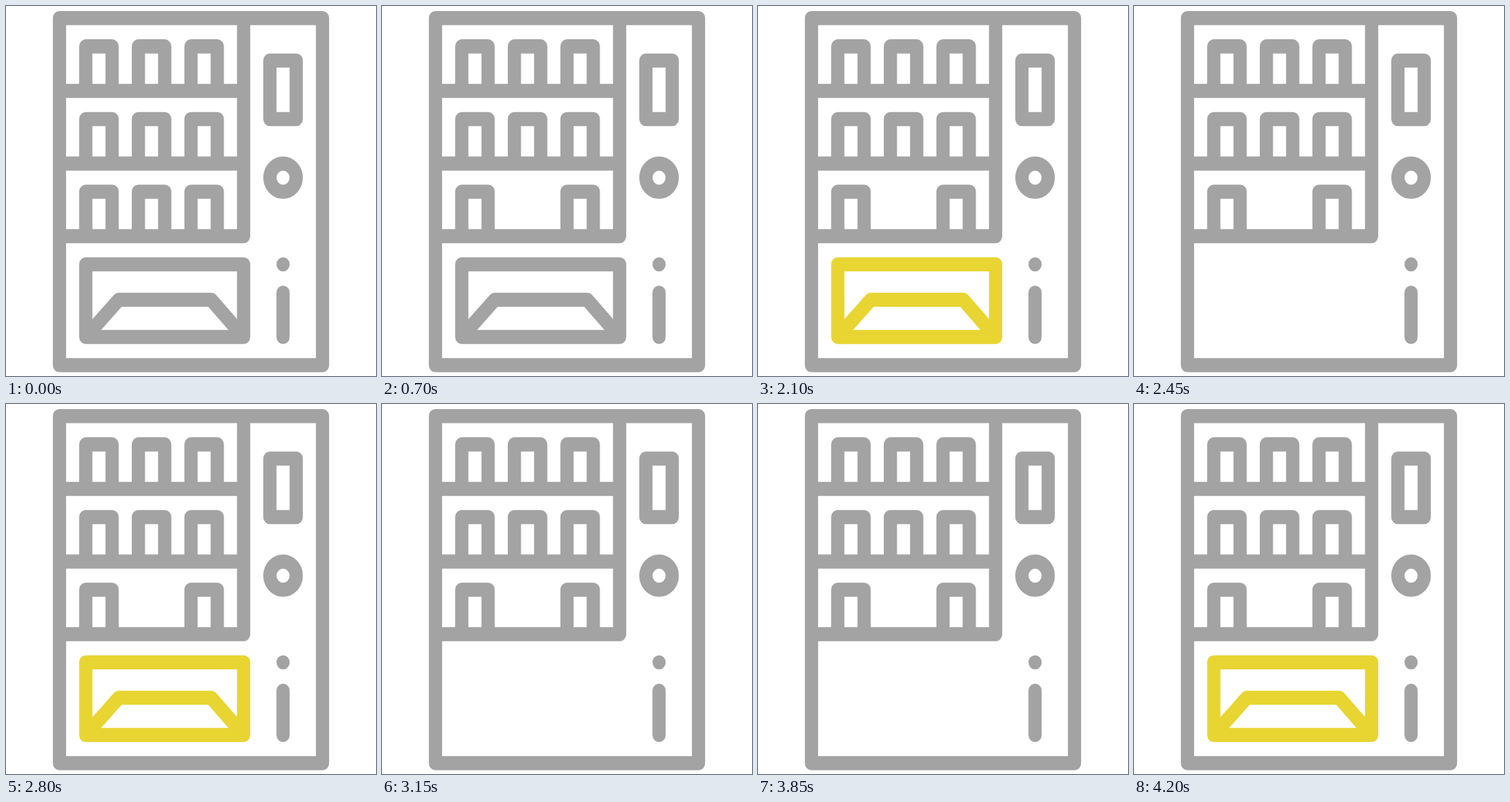
These frames come from a looping animation (512 px wide and 512 px high, 4.55 s). An HTML page:

```html
<!DOCTYPE html>
<html lang="en">
<head>
<meta charset="utf-8">
<title>Vending machine</title>
<style>
  :root { --grey: #a3a3a3; --yellow: #e8d532; }
  html, body { margin: 0; width: 100%; height: 100%; overflow: hidden; background: #fff; }
  svg {
    display: block; width: 100%; height: 100%;
    fill: none; stroke: var(--grey); stroke-width: 18.3; stroke-linejoin: round;
  }
  .sold, .tray, .flap { animation: 4550ms step-end infinite; }
  .sold { animation-name: sell; }
  .tray { animation-name: blink; }
  .flap { animation-name: open; }

  /* The loop has 13 equal beats of 350 ms */
  @keyframes sell {
    0% { stroke: var(--grey); }
    7.69%, 23.07% { stroke: var(--yellow); }
    15.38%, 30.76%, 100% { stroke: transparent; }
  }
  @keyframes open {
    0%, 46.15%, 100% { visibility: visible; }
    38.46% { visibility: hidden; }
  }
  @keyframes blink {
    0%, 100% { stroke: var(--grey); }
    46.15%, 61.53%, 76.92%, 92.3% { stroke: var(--yellow); }
    53.84%, 69.23%, 84.61% { stroke: transparent; }
  }
</style>
</head>
<body>
<!-- The drawing is stretched slightly in height -->
<svg viewBox="0 0 512 478.5" preserveAspectRatio="none">
  <defs>
    <path id="item" d="M110.4 57.5V0H146.8V57.5"/>
    <g id="pair">
      <use href="#item"/>
      <use href="#item" x="145.6"/>
    </g>
  </defs>

  <use href="#pair" y="52.2"/>
  <use href="#item" x="72.8" y="52.2"/>
  <use href="#pair" y="146.3"/>
  <use href="#item" x="72.8" y="146.3"/>
  <use href="#pair" y="240.2"/>
  <use class="sold" href="#item" x="72.8" y="240.2"/>

  <path d="M74 15.6H438V464.5H74Z"/>
  <path d="M74 109.8H328.8M74 203.7H328.8M74 297.7H328.8V15.6"/>

  <path d="M365.2 70.6H401.6V146.3H365.2Z"/>
  <circle cx="383.4" cy="222" r="18.2"/>
  <path stroke-linecap="round" d="M383.4 334.1h.01M383.4 370.8V428"/>

  <g class="tray">
    <path class="flap" d="M110.4 428L156 379.9H284L328.8 428"/>
    <path d="M110.4 334.1H328.8V428H110.4Z"/>
  </g>
</svg>
</body>
</html>
```
